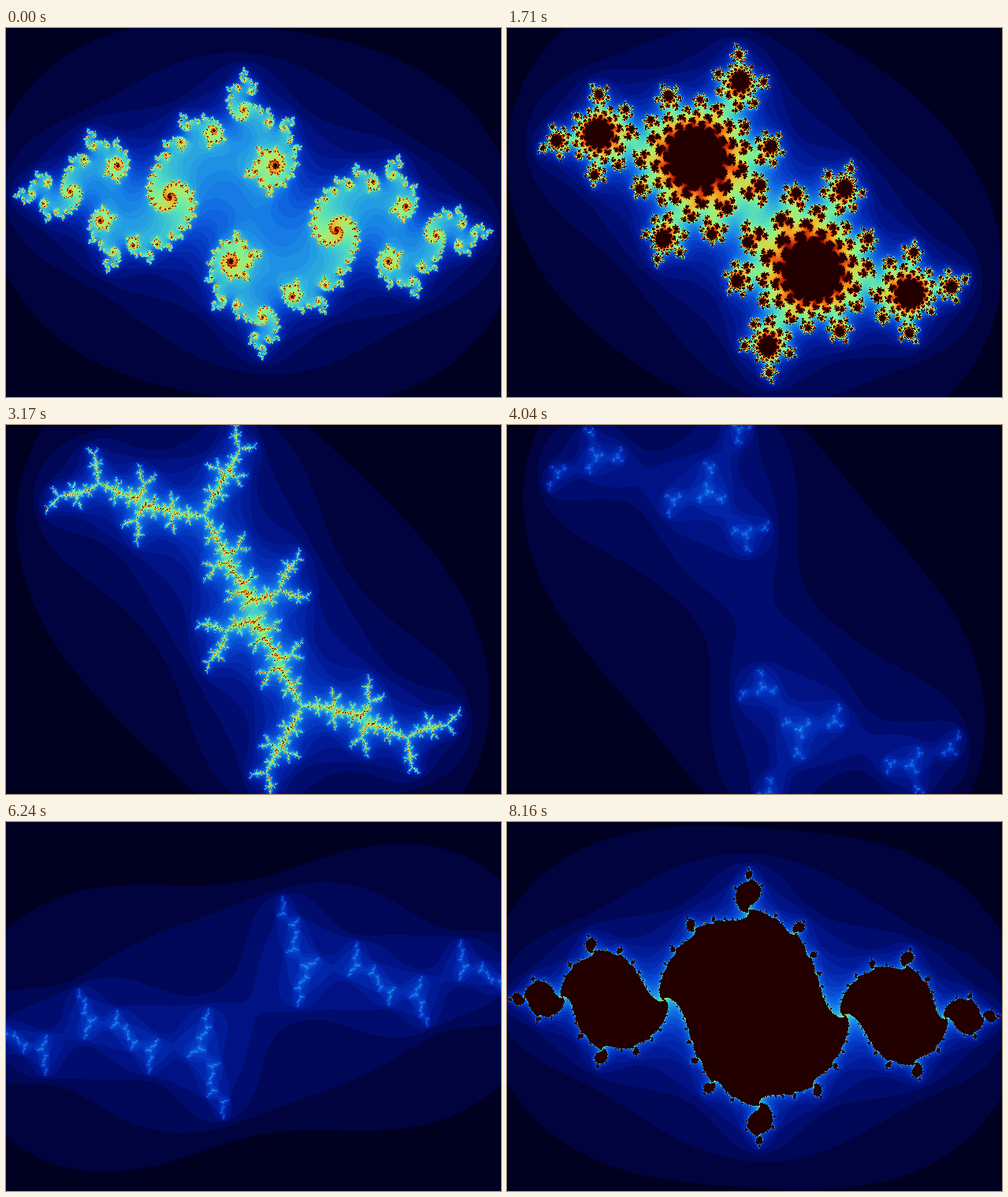
Animation of 628 by 468 pixels, one loop 8490 ms. Source, as an HTML page with a canvas:

```html
<!DOCTYPE html>
<html lang="en">
<head>
<meta charset="utf-8">
<title>Julia sets</title>
<style>
html, body { margin: 0; width: 100%; height: 100%; overflow: hidden; background: #000; }
canvas { display: block; }
</style>
</head>
<body>
<canvas id="stage" width="628" height="468"></canvas>
<script>
const WIDTH = 628, HEIGHT = 468, LOOP = 8490, LEVELS = 64;
const CENTER = { x: 313, y: 235 }, SCALE = { x: 200, y: 218 };
const STARTS = [0, 250, 780, 1240, 1710, 2170, 2700, 3170, 3570, 4040,
  4500, 4970, 5500, 5840, 6240, 6570, 6970, 7360, 7760, 8160];
const ctx = document.getElementById('stage').getContext('2d');

// Bernstein-style colour ramp: dark blue, cyan, yellow, red, near black
const palette = Array.from({ length: LEVELS }, (_, n) => {
  const t = n / LEVELS, s = 1 - t;
  return [9 * s * t ** 3, 15 * s * s * t * t, 8.5 * s ** 3 * t].map(v => Math.floor(255 * v));
});

function escapeLevel(x, y, cx, cy) {
  let n = 0;
  for (; n < LEVELS - 1; n++) {
    const xx = x * x, yy = y * y;
    if (xx + yy > 4) break;
    y = 2 * x * y + cy;
    x = xx - yy + cx;
  }
  return n;
}

function renderJulia(step) {
  // The constant moves along a diagonal line through -0.4 + 0.6i
  const shift = ((step + 6) % STARTS.length - 10) / 10;
  const cx = -0.4 + shift, cy = 0.6 + shift;
  const image = ctx.createImageData(WIDTH, HEIGHT);
  let i = 0;
  for (let py = 0; py < HEIGHT; py++) {
    const y = (CENTER.y - py) / SCALE.y;
    for (let px = 0; px < WIDTH; px++) {
      const color = palette[escapeLevel((px - CENTER.x) / SCALE.x, y, cx, cy)];
      image.data[i++] = color[0];
      image.data[i++] = color[1];
      image.data[i++] = color[2];
      image.data[i++] = 255;
    }
  }
  return image;
}

const cache = [];
const julia = step => cache[step] ??= renderJulia(step);
let shown = -1;

function draw() {
  const time = performance.now() % LOOP;
  const step = STARTS.findLastIndex(start => start <= time);
  if (step !== shown) {
    ctx.putImageData(julia(step), 0, 0);
    shown = step;
  } else {
    julia((step + 1) % STARTS.length); // prepare the next picture ahead of time
  }
  requestAnimationFrame(draw);
}
draw();
</script>
</body>
</html>
```
